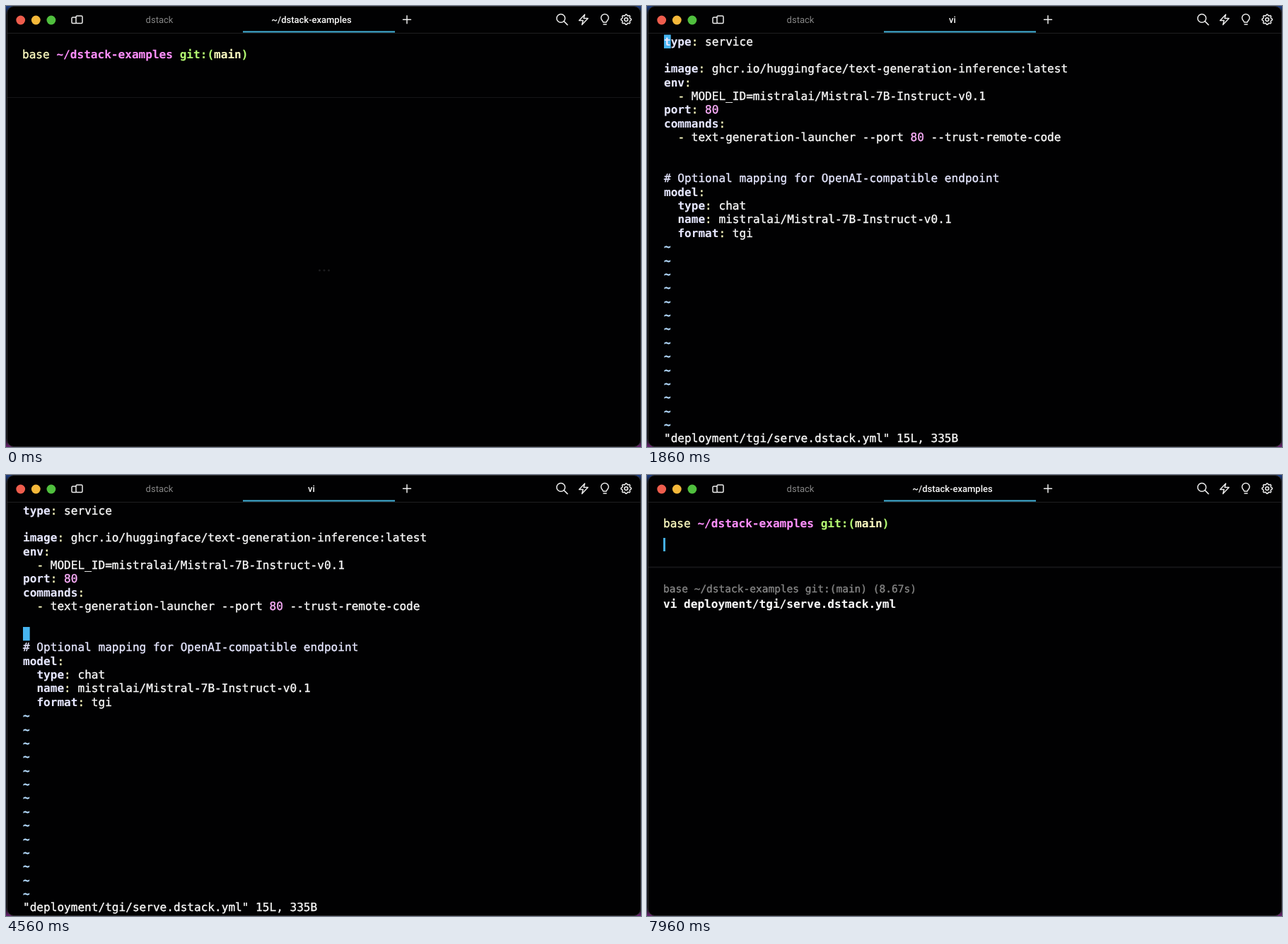
Recreate the animation shown at these times as an HTML page. Size 898 by 624 pixels, loop 8000 ms.

```html
<!DOCTYPE html>
<html lang="en">
<head>
<meta charset="utf-8">
<title>Terminal</title>
<style>
html, body { margin: 0; width: 100%; height: 100%; overflow: hidden; background: #000; }
svg { display: block; width: 898px; height: 624px; }
text { white-space: pre; text-rendering: geometricPrecision; color: #f8f8f8; }
text, tspan { fill: currentColor; stroke: currentColor; stroke-width: 0; }
.mono { font: 16.08px "DejaVu Sans Mono", monospace; }
.mono, .mono tspan { stroke-width: .35px; }
.small { font-size: 14.5px; }
.tab { font: 13px Roboto, sans-serif; text-anchor: middle; }
.active { font-weight: 500; }
.bold, .pink, .key, .tilde { font-weight: 700; }
.mono.bold, .mono .bold, .mono .bold tspan, .mono .pink, .mono .key { stroke-width: .1px; }
.yellow { color: #fefdc2; }
.pink { color: #ff8ffd; }
.green { color: #b4fa72; }
.key, .note { color: #e5e6fe; }
.num { color: #ffb1fe; }
.tilde { color: #b5dcfe; }
.grey { color: #868686; }
.ghost { color: #5e5e5e; }
.icon { fill: none; stroke: #ececec; stroke-width: 1.5; stroke-linejoin: round; stroke-linecap: round; }
</style>
</head>
<body>
<svg viewBox="0 0 898 624">
  <defs><linearGradient id="desk" x2="0" y2="1">
    <stop stop-color="#1d3f86"/><stop offset=".02" stop-color="#08080c"/>
    <stop offset=".98" stop-color="#08080c"/><stop offset="1" stop-color="#6a2470"/>
  </linearGradient></defs>
  <rect width="898" height="624" fill="url(#desk)"/>
  <rect x="1.5" y=".5" width="896" height="623" rx="9.5" fill="#010102" stroke="#2e2e30"/>
  <path d="M2 38.5H897" stroke="#1e1e20"/>
  <path d="M335 36.500H550" stroke="#45b5dc" stroke-width="2"/>
  <circle cx="20.700" cy="20" r="6.400" fill="#ee5d4d"/>
  <circle cx="42.300" cy="20" r="6.400" fill="#f5b83a"/>
  <circle cx="63.900" cy="20" r="6.400" fill="#50bf3e"/>
  <g class="icon">
    <path d="M99 16H94.500q-1.500 0-1.500 1.500V23q0 1.500 1.500 1.500H99"/>
    <rect x="99" y="14" width="9" height="10.500" rx="1.500"/>
    <path d="M561.500 19.300h11M567 13.800v11"/>
    <g transform="translate(0 -.4)">
      <circle cx="784.700" cy="17.800" r="5.900"/><path d="M789 22l5 5"/>
      <path d="M818.500 12.500l-8 8.500h5.500l-1.500 6 8.500-9h-6z"/>
      <path d="M844.500 23.500c0-2-3-3-3-6.300a5.300 5.300 0 0 1 10.600 0c0 3.300-3 4.300-3 6.300zM845 26.500h4"/>
      <path id="gear"/><circle cx="877" cy="19.500" r="2.400"/>
    </g>
  </g>
  <text class="tab grey" x="217" y="24">dstack</text>
  <text class="tab active" id="title" x="432" y="24"></text>
  <g id="shell">
    <path id="rule" stroke="#151517"/>
    <g id="dots" fill="#1b1b1d"><circle cx="443.500" cy="374" r="1.600"/><circle cx="450" cy="374" r="1.600"/><circle cx="456.500" cy="374" r="1.600"/></g>
    <text class="mono" x="23" y="73.500"><tspan class="yellow">base </tspan><tspan class="pink">~/dstack-examples </tspan><tspan class="green bold">git:(<tspan class="yellow">main</tspan>)</tspan></text>
    <text class="mono" x="23" y="103.300"><tspan id="cmd"></tspan><tspan id="args"></tspan></text>
    <rect id="caret" y="89" width="3" height="19" fill="#45aee6"/>
    <g id="done">
      <text class="mono small grey" x="23" y="165.500">base ~/dstack-examples git:(main) (8.67s)</text>
      <text class="mono bold" x="23" y="188.300">vi deployment/tgi/serve.dstack.yml</text>
    </g>
  </g>
  <g id="editor">
    <rect id="block" width="9.680" height="19.380" fill="#46b4f0"/>
    <g id="page"></g>
    <text class="mono" id="status" x="24" y="617.300"></text>
  </g>
</svg>
<script>
const $ = id => document.getElementById(id);
const LOOP = 8000, CHAR = 9.68, ROW = 19.38, LEFT = 24;
const OPEN = 1800, CLOSE = 7960;
const path = 'deployment/tgi/serve.dstack.yml';
const moves = [2300, 2430, 3100, 3230, 3360, 3730, 4330, 4450, 4560, 4700, 5360];
const keys = [6630, 6860, 7030];

const file = `type: service

image: ghcr.io/huggingface/text-generation-inference:latest
env:
  - MODEL_ID=mistralai/Mistral-7B-Instruct-v0.1
port: 80
commands:
  - text-generation-launcher --port 80 --trust-remote-code


# Optional mapping for OpenAI-compatible endpoint
model:
  type: chat
  name: mistralai/Mistral-7B-Instruct-v0.1
  format: tgi`.split('\n');
while (file.length < 29) file.push('~');

const span = (style, text) => `<tspan class="${style}">${text}</tspan>`;

function highlight(line) {
  if (line[0] === '#') return span('note', line);
  if (line === '~') return span('tilde', line);
  return line.replace(/^( *)(\w+)(:)|^( +)(-)|\b80\b/g, (all, pad, key, colon, indent, dash) =>
    key ? pad + span('key', key) + span('yellow', colon)
      : dash ? indent + span('yellow', dash)
      : span('num', all));
}

$('page').innerHTML = file.map((line, i) =>
  `<text class="mono" x="${LEFT}" y="${55.5 + i * ROW}">${highlight(line)}</text>`).join('');

// Eight-toothed outline
let gear = '';
for (let i = 0; i < 32; i++) {
  const a = (i - .5) * Math.PI / 16, r = i % 4 < 2 ? 7.2 : 5.8;
  gear += (i ? 'L' : 'M') + (877 + r * Math.cos(a)).toFixed(2) + ' ' + (19.5 + r * Math.sin(a)).toFixed(2);
}
$('gear').setAttribute('d', gear + 'z');

const show = (id, on) => $(id).style.display = on ? '' : 'none';
const passed = (times, t) => times.filter(x => x <= t).length;

function drawEditor(t) {
  const typed = passed(keys, t);
  const row = typed ? 29 : passed(moves, t);
  $('block').setAttribute('x', LEFT + typed * CHAR);
  $('block').setAttribute('y', 40.6 + row * ROW);
  $('status').textContent = typed ? ':wq'.slice(0, typed) : `"${path}" 15L, 335B`;
}

function drawShell(t) {
  const done = t >= CLOSE, accepted = t >= 1400;
  const running = t >= 1760 && !done;
  const typed = done || running ? 0 : passed([560, 760], t);
  const full = 'vi ' + path;
  const hint = typed && t >= 600;
  $('cmd').textContent = full.slice(0, typed);
  $('cmd').setAttribute('class', typed === 2 ? 'green' : '');
  $('args').textContent = hint ? full.slice(typed) : '';
  $('args').setAttribute('class', accepted ? '' : 'ghost');
  $('caret').setAttribute('x', 23 + CHAR * (typed && accepted ? full.length + 1 : typed));
  show('caret', t >= 200 && t < 1100 || accepted && !running);
  $('rule').setAttribute('d', done ? 'M2 130.500H897' : 'M2 129.500H897');
  $('rule').setAttribute('stroke-width', done ? 2 : 1);
  show('dots', !done);
  show('done', done);
}

function frame(now) {
  const t = now % LOOP, editing = t >= OPEN && t < CLOSE;
  $('title').textContent = editing ? 'vi' : '~/dstack-examples';
  show('editor', editing);
  show('shell', !editing);
  (editing ? drawEditor : drawShell)(t);
}

const start = performance.now();
function tick() {
  frame(performance.now() - start);
  requestAnimationFrame(tick);
}
tick();
</script>
</body>
</html>
```
